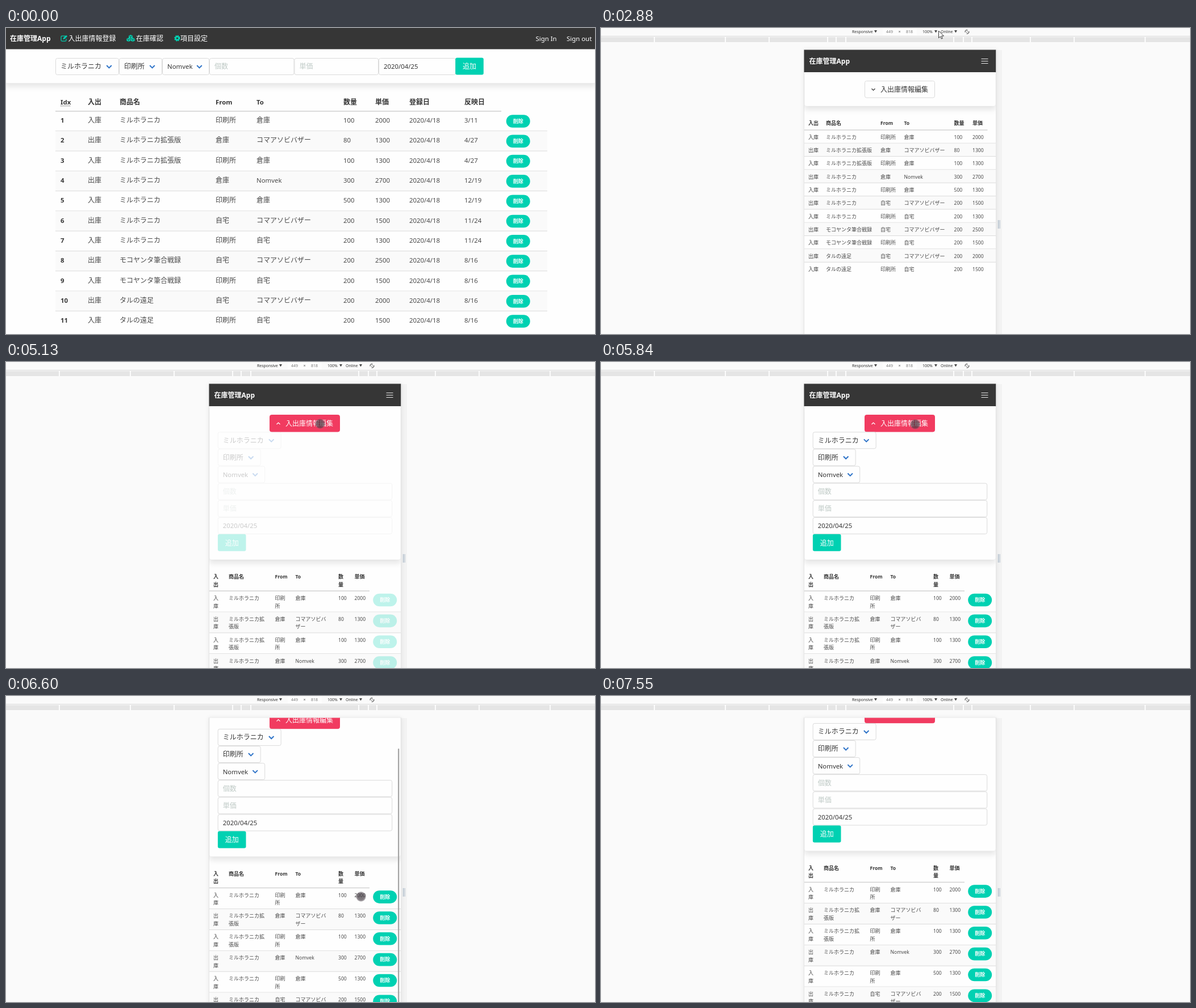
Animation, 1037 px wide and 540 px high, one loop 7780 ms. Source, as an HTML page:

```html
<!DOCTYPE html>
<html lang="ja">
<head>
<meta charset="utf-8">
<title>在庫管理App</title>
<style>
html, body { margin: 0; width: 100%; height: 100%; overflow: hidden; background: #fefefe; }
svg { display: block; width: 1037px; height: 540px; font-family: "Noto Sans", "Noto Sans CJK JP", "Noto Sans CJK", sans-serif; }
text { white-space: pre; }
.panel { fill: #fefefe; stroke: rgba(10,10,10,.03); filter: drop-shadow(0 6px 5px rgba(10,10,10,.1)); }
.field { fill: #fefefe; stroke: #dbdbdb; }
</style>
</head>
<body>
<svg id="stage" viewBox="0 0 1037 540"></svg>
<script>
const LOOP = 7780;
const TEAL = '#00d1b2', DARK = '#363636', GREY = '#4a4a4a', LINE = '#dbdbdb', HINT = '#bfcac6';

const GAME = 'ミルホラニカ', EXTRA = GAME + '拡張版', BRUSH = 'モコヤンタ筆合戦録', TRIP = 'タルの遠足';
const FAIR = 'コマアソビバザー', SHOP = 'Nomvek';
const HEAD = ['入出', '商品名', 'From', 'To', '数量', '単価', '登録日', '反映日'];
const ROWS = [
  ['入庫', GAME, '印刷所', '倉庫', '100', '2000', '3/11'],
  ['出庫', EXTRA, '倉庫', FAIR, '80', '1300', '4/27'],
  ['入庫', EXTRA, '印刷所', '倉庫', '100', '1300', '4/27'],
  ['出庫', GAME, '倉庫', SHOP, '300', '2700', '12/19'],
  ['入庫', GAME, '印刷所', '倉庫', '500', '1300', '12/19'],
  ['出庫', GAME, '自宅', FAIR, '200', '1500', '11/24'],
  ['入庫', GAME, '印刷所', '自宅', '200', '1300', '11/24'],
  ['出庫', BRUSH, '自宅', FAIR, '200', '2500', '8/16'],
  ['入庫', BRUSH, '印刷所', '自宅', '200', '1500', '8/16'],
  ['出庫', TRIP, '自宅', FAIR, '200', '2000', '8/16'],
  ['入庫', TRIP, '印刷所', '自宅', '200', '1500', '8/16']
];

// ---- drawing helpers: y is the vertical centre of a text ----
const isLatin = s => /^[\x20-\x7e]+$/.test(s);
function text(s, x, y, size = 12, fill = GREY, weight = 400, anchor = 'start') {
  const px = isLatin(s) ? size * .95 : size;
  return `<text x="${x}" y="${y + size * .37}" font-size="${px}" fill="${fill}" font-weight="${weight}" text-anchor="${anchor}">${s}</text>`;
}
const bold = (s, x, y, size) => text(s, x, y, size, DARK, 700);
const rect = (x, y, w, h, fill, r = 0) => `<rect x="${x}" y="${y}" width="${w}" height="${h}" rx="${r}" fill="${fill}"/>`;
const path = (d, stroke, width, fill = 'none') => `<path d="${d}" fill="${fill}" stroke="${stroke}" stroke-width="${width}"/>`;
const group = (x, y, body) => `<g transform="translate(${x} ${y})">${body}</g>`;
const panel = (x, y, w, h) => `<rect class="panel" x="${x}" y="${y}" width="${w}" height="${h}" rx="4"/>`;
const chevron = (x, y, r, color, width, up = 1) =>
  path(`M${x - r} ${y - r * up / 2}L${x} ${y + r * up / 2}L${x + r} ${y - r * up / 2}`, color, width);

const field = (x, y, w, s, fill = DARK) =>
  `<rect class="field" x="${x + .5}" y="${y + .5}" width="${w - 1}" height="29" rx="3"/>` + text(s, x + 9, y + 15, 12, fill);
const select = (x, y, w, s) => field(x, y, w, s) + chevron(x + w - 17.5, y + 15.2, 4.3, '#2f74c8', 2);
const addButton = (x, y) => rect(x + .2, y - .4, 49.6, 30, TEAL, 3) + text('追加', x + 25, y + 15, 12, '#fff', 500, 'middle');
const deleteButton = (x, y) => rect(x - 21, y - 11.3, 42, 22.6, TEAL, 11.3) + text('削除', x, y, 9, '#fff', 700, 'middle');

// ---- icons ----
const editIcon = path('M2.5-4H-3.5Q-5-4-5-2.5V3.5Q-5 5-3.5 5H2.5Q4 5 4 3.5V1', TEAL, 1.2) +
  path('M-1.5 2L-1 -.5L4-5.3L6-3.3L1 1.5Z', 'none', 0, TEAL);
const cube = (x, y) => group(x, y, path('M0-3.4L3.4-1.9V1.9L0 3.5L-3.4 1.9V-1.9Z', 'none', 0, TEAL) +
  path('M-2.7-1.5L0-.3L2.7-1.5M0-.3V3', DARK, .8));
const cubesIcon = cube(0, -2.6) + cube(-3.7, 2.6) + cube(3.7, 2.6);
const cogIcon = `<circle r="3" fill="none" stroke="${TEAL}" stroke-width="2.6"/>` +
  `<circle r="4.5" fill="none" stroke="${TEAL}" stroke-width="1.8" stroke-dasharray="1.9 1.634"/>`;

// ---- wide layout ----
function wideNav() {
  const items = [[102, editIcon, 109.5, '入出庫情報登録'], [219.5, cubesIcon, 229, '在庫確認'], [301.5, cogIcon, 307, '項目設定']];
  return rect(-2, -2, 1041, 39.4, DARK) + text('在庫管理App', 7, 18.1, 12, '#fff', 700) +
    items.map(([ix, icon, x, s]) => group(ix, 18.1, icon) + text(s, x, 18.1, 12, '#fff')).join('') +
    text('Sign In', 932.5, 18.1, 12, '#fff') + text('Sign out', 987, 18.1, 12, '#fff');
}

function wideBody() {
  const xs = [144, 200, 369, 441, 594, 650, 710, 807], pitch = 35.3;
  let out = select(87, 53, 112, GAME) + select(199, 53, 76, '印刷所') + select(275, 53, 83, SHOP) +
    field(358, 53, 149.5, '個数', HINT) + field(507.5, 53, 148.5, '単価', HINT) + field(656, 53, 136, '2020/04/25') + addButton(791, 53);
  out += bold('Idx', 96, 131, 12) + '<path d="M96 137.5H114" stroke="#363636" stroke-dasharray="1 1"/>';
  HEAD.forEach((s, i) => out += bold(s, xs[i], 131, 12));
  out += rect(87, 146, 785, 1.5, '#d0d0d0');
  ROWS.forEach((row, k) => {
    const y = 162.7 + k * pitch, top = 146.9 + k * pitch;
    if (k % 2) out += rect(87, top, 866, pitch - 1, '#fafafa');
    if (k < 10) out += rect(87, top + pitch - 1, 866, 1, LINE);
    out += bold(String(k + 1), 96, y, 12);
    [...row.slice(0, 6), '2020/4/18', row[6]].forEach((s, i) => out += text(s, xs[i], y));
    out += deleteButton(901.7, y + 1.8);
  });
  return out;
}

const wide = (navX, bodyX, y) => panel(navX - 2, y + 36, 1041, 61.5) + group(navX, y, wideNav()) + group(bodyX, y, wideBody());

// ---- narrow layout ----
const narrowNav = rect(357, 38, 339, 40, DARK) + text('在庫管理App', 366.5, 58.6, 12, '#fff', 700) +
  [54, 58, 62].map(y => rect(669.5, y, 12, 1, '#e8e8e8')).join('');

const toggle = (fill, edge, ink, up) => `<rect x="464.5" y="93.5" width="123" height="29.5" rx="3" fill="${fill}" stroke="${edge}"/>` +
  chevron(479.5, 108.5, 3, ink, 1.2, up) + text('入出庫情報編集', 492, 108.3, 12, ink);

function closedPage() {
  const xs = [365, 396, 492, 533.5, 621.5, 654], pitch = 23.33;
  let out = panel(358, 77, 337, 61) + narrowNav + toggle('#fefefe', LINE, DARK, 1);
  xs.forEach((x, i) => out += bold(HEAD[i], x, 168, 9));
  out += rect(358, 179.3, 322.5, 1.4, '#d0d0d0');
  ROWS.forEach((row, k) => {
    const top = 180.4 + k * pitch;
    if (k % 2) out += rect(358, top, 337, pitch - 1, '#fafafa');
    if (k < 10) out += rect(358, top + pitch - 1, 337, 1, LINE);
    xs.forEach((x, i) => out += text(row[i], x, 192.2 + k * pitch, 9));
  });
  return out;
}

function openPage() {
  const xs = [365, 392, 473.5, 509.5, 585, 613.5], limit = [1, 7, 2, 6, 1, 9], pitch = 36.85;
  const wrap = (s, n) => isLatin(s) ? [s] : s.match(new RegExp(`.{1,${n}}`, 'g'));
  const cell = (s, i, y, draw) => wrap(s, limit[i]).map((part, j) => draw(part, xs[i], y + j * 13.5, 9)).join('');
  let out = panel(358, 77, 337, 272) + narrowNav + toggle('#f13b60', '#f13b60', '#fff', -1), extra = '';
  extra += select(372.7, 123.3, 112, GAME) + select(372.7, 153.4, 76, '印刷所') + select(372.7, 183.5, 83.5, SHOP) +
    field(372.7, 213.6, 307.5, '個数', HINT) + field(372.7, 243.8, 307.5, '単価', HINT) +
    field(372.7, 273.9, 307.5, '2020/04/25') + addButton(372.7, 304.2);
  xs.forEach((x, i) => out += cell(HEAD[i], i, 378.7, bold));
  out += rect(358, 403.3, 282, 1.4, '#d0d0d0');
  ROWS.forEach((row, k) => {
    const top = 404.7 + k * pitch;
    if (k % 2) out += rect(358, top, 337, pitch - 1, '#fafafa');
    out += rect(358, top + pitch - 1, 337, 1, LINE);
    xs.forEach((x, i) => out += cell(row[i], i, 416.7 + k * pitch, text));
    extra += deleteButton(667.2, 420 + k * pitch);
  });
  return out + `<g id="extra">${extra}</g>`;
}

// ---- browser frame ----
function frame() {
  const tri = x => path(`M${x} 4H${x + 5}L${x + 2.5} 8.5Z`, 'none', 0, '#444');
  const small = (s, x, fill = '#333') => text(s, x, 6.7, 7.3, fill);
  let out = rect(0, 0, 1037, 540, '#fafafa') + rect(496, 1, 60, 12, '#fdfdfd') + rect(0, 14, 1037, 1, '#d8d8d8') +
    rect(0, 15, 1037, 11, '#fcfcfc') + rect(0, 16, 1037, 9, '#e5e5e5');
  [94, 219, 296, 399, 414, 431, 621, 638, 653, 756, 833, 958].forEach(x => out += rect(x - 1, 16, 2, 9, '#fcfcfc'));
  out += small('Responsive', 442) + tri(481) + small('449', 502, '#777') + small('×', 523.5, '#555') + small('818', 537, '#777') +
    small('100%', 566) + tri(587) + small('Online', 598) + tri(622);
  out += group(644.5, 6.7, '<rect x="-1.5" y="-2.7" width="3" height="5.4" rx=".6" transform="rotate(-45)" fill="none" stroke="#555" stroke-width=".8"/>' +
    path('M-3.6 1A3.7 3.7 0 0 1 1-3.6M3.6-1A3.7 3.7 0 0 1-1 3.6', '#555', .8));
  out += rect(695, 39, 11, 501, '#f3f3f3') + rect(699, 339, 1, 15, '#9fb2c2') + rect(701.5, 339, 1, 15, '#9fb2c2');
  return out + '<rect x="357.5" y="38.5" width="338" height="520" fill="#fefefe" stroke="#e6e6e6" style="filter:drop-shadow(0 0 3px rgba(0,0,0,.08))"/>';
}

document.getElementById('stage').innerHTML = `
  <defs>
    <clipPath id="screen"><rect x="357.5" y="38.6" width="337.7" height="502"/></clipPath>
    <radialGradient id="spot"><stop offset=".55" stop-color="#40383f" stop-opacity=".68"/>
      <stop offset=".82" stop-color="#4a404a" stop-opacity=".58"/><stop offset="1" stop-color="#777" stop-opacity=".2"/></radialGradient>
  </defs>
  <g id="full">${rect(0, 0, 1037, 540, '#fefefe')}${wide(0, 0, 0)}</g>
  <g id="device">${frame()}
    <g clip-path="url(#screen)">
      <g id="squeezed">${wide(359.2, 365.2, 40.5)}</g>
      <g id="closed">${closedPage()}</g>
      <g id="open">${openPage()}</g>
      <rect id="thumb" x="690" width="2.3" height="503" rx="1" fill="#a6a6a6"/>
      <circle id="touch" r="9" fill="url(#spot)"/>
    </g>
    <path id="arrow" d="M0 0V12.5L3 9.8L4.9 14L6.8 13.2L5 9H9Z" fill="#fff" stroke="#222" stroke-width=".9"/>
  </g>`;

// ---- motion ----
const $ = id => document.getElementById(id);
const show = (id, on) => $(id).style.display = on ? '' : 'none';
const move = (id, x, y) => $(id).setAttribute('transform', `translate(${x} ${y})`);

const outEase = p => 1 - (1 - p) ** 1.4;
const bothEase = p => p < .5 ? 8 * p ** 4 : 1 - 8 * (1 - p) ** 4;
const inOut = p => p * p * (3 - 2 * p);

// progress in n jumps, the first at t0 and the last at t1
function jumps(t, t0, t1, n) {
  if (t < t0) return 0;
  return Math.min(1, (Math.floor((t - t0) / (t1 - t0) * (n - 1) + 1e-6) + 1) / n);
}

// pointer legs: start, end, jumps, destination, easing
const LEGS = [
  [2880, 3630, 11, 574, 71, inOut],
  [3720, 4280, 8, 554.3, 107.6, outEase],
  [4430, 4431, 1, 553, 109, p => p],
  [5840, 6300, 7, 625, 354, bothEase],
  [7000, 7550, 8, 650, 552, inOut]
];
const SCROLL = [[6450, 10], [6520, 40], [6600, 65.4], [6690, 75.4]];

function pointer(t) {
  let x = 595, y = 3.5;
  for (const [t0, t1, n, tx, ty, ease] of LEGS) {
    if (t < t0) break;
    const p = ease(jumps(t, t0, t1, n));
    x += (tx - x) * p;
    y += (ty - y) * p;
  }
  return [x, y];
}

function draw(t) {
  const [x, y] = pointer(t), seen = t >= 2880 && t < 7550;
  const scroll = SCROLL.reduce((v, [at, to]) => t >= at ? to : v, 0);
  show('full', t < 1940);
  show('device', t >= 1940);
  show('squeezed', t < 2020);
  show('closed', t >= 2020 && t < 5060);
  show('open', t >= 5060);
  show('arrow', seen && y < 39);
  show('touch', seen && y >= 39);
  show('thumb', scroll > 0);
  move('arrow', x, y);
  move('touch', x, y);
  move('open', 0, -scroll);
  $('extra').style.opacity = jumps(t, 5060, 5300, 4);
  $('thumb').setAttribute('y', 39 + scroll * .82);
  $('thumb').style.opacity = 1 - jumps(t, 7250, 7550, 5);
}

const start = performance.now();
function tick() {
  draw((performance.now() - start) % LOOP);
  requestAnimationFrame(tick);
}
tick();
</script>
</body>
</html>
```
